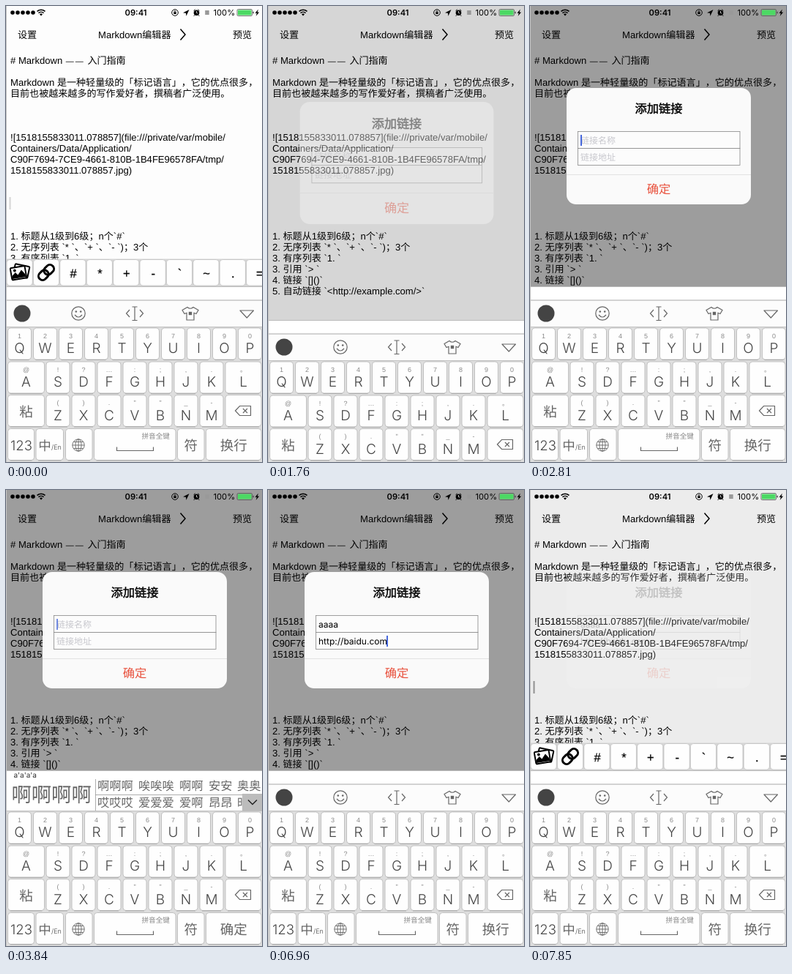
An HTML page that plays this animation: 350x623 px, repeating every 8 s.

```html
<!DOCTYPE html>
<html lang="zh-CN">
<head>
<meta charset="utf-8">
<style>
html, body { margin: 0; width: 100%; height: 100%; overflow: hidden; background: #fff; }
svg { display: block; width: 350px; height: 623px; }
text {
  font-family: "Liberation Sans", "Noto Sans CJK SC", sans-serif;
  white-space: pre; text-spacing-trim: space-all; font-feature-settings: "chws" 0;
  text-rendering: geometricPrecision;
}
.ui { font-family: Inter, "Noto Sans CJK SC", sans-serif; }
.key { font-family: Inter, "Noto Sans CJK SC", sans-serif; font-weight: 300; fill: #444; }
.han { fill: #666; }
.hint { fill: #888; }
.line { fill: none; stroke: #666; stroke-width: 1.2; }
</style>
</head>
<body>
<svg id="stage" viewBox="0 0 350 623" xmlns="http://www.w3.org/2000/svg"></svg>
<script>
const LOOP = 8000, BODY = 13.07;

const text = (x, y, size, str, attrs = '') =>
  `<text x="${x}" y="${y}" font-size="${size}" ${attrs}>${str}</text>`;
const mid = (x, y, size, str, attrs = '') =>
  text(x, y, size, str, 'text-anchor="middle" ' + attrs);
const rect = (x, y, w, h, fill, attrs = '') =>
  `<rect x="${x}" y="${y}" width="${w}" height="${h}" fill="${fill}" ${attrs}/>`;
const path = (d, attrs = 'class="line"') => `<path d="${d}" ${attrs}/>`;
const circle = (x, y, r, attrs) => `<circle cx="${x}" cy="${y}" r="${r}" ${attrs}/>`;
const thin = 'fill="none" stroke="#000" stroke-width="1"';

function statusBar() {
  let s = '';
  for (let i = 0; i < 5; i++) s += circle(9 + i * 7, 9, 2.8, '');
  s += path('M42.5 7.4a8 8 0 0 1 11 0M44.5 9.6a5 5 0 0 1 7 0', 'fill="none" stroke="#000" stroke-width="1.5"');
  s += path('M46 11.2a3 3 0 0 1 4 0l-2 2.2z', '');
  s += mid(177.5, 13, 11.2, '09:41', 'class="ui" font-weight="600"');
  s += circle(231, 9, 4.3, thin) + rect(229.3, 8.3, 3.4, 2.7, '#000') +
    path('M230 8.5v-1a1 1 0 0 1 2 0v1', 'fill="none" stroke="#000" stroke-width=".8"');
  s += path('M250.5 5l-8.5 4.3 4 .4.4 4z', '');
  s += circle(260.5, 9.2, 3.8, '') +
    path('M256.6 6.6l2-1.9M264.4 6.6l-2-1.9M257.8 12.4l-1 1.4M263.2 12.4l1 1.4', thin) +
    path('M260.5 7v2.3l1.6 .8', 'fill="none" stroke="#fff" stroke-width=".8"');
  s += rect(272.2, 6, 5.5, 6, '#999');
  s += text(283.5, 13, 11.2, '100%', 'class="ui"');
  s += rect(316, 4.5, 20.5, 9, 'none', 'rx="1.5" stroke="#555" stroke-width=".8"') +
    rect(317, 5.5, 18.5, 7, '#4cd964') + rect(337.5, 7.5, 1.5, 3, '#555', 'rx=".7"');
  return s + path('M345 4.5l-4.5 5.2h2.4l-1.2 4 4.5-5.3h-2.5z', '');
}

function page() {
  const lines = {
    0: '# Markdown <tspan font-size="11" letter-spacing="2" dx="1">——</tspan> 入门指南',
    2: 'Markdown 是一种轻量级的「标记语言」，它的优点很多，',
    3: '目前也被越来越多的写作爱好者，撰稿者广泛使用。',
    7: '![1518155833011.078857](file:///private/var/mobile/',
    8: 'Containers/Data/Application/',
    9: 'C90F7694-7CE9-4661-810B-1B4FE96578FA/tmp/',
    10: '1518155833011.078857.jpg)',
    16: '1. 标题从1级到6级；n个`#`',
    17: '2. 无序列表 `* `、`+ `、`- `)；3个',
    18: '3. 有序列表 `1. `',
    19: '3. 引用 `&gt; `',
    20: '4. 链接 `[]()`',
    21: '5. 自动链接 `&lt;http://example.com/&gt;`'
  };
  let s = rect(0, 0, 350, 623, '#fdfdfd');
  s += text(16, 44, BODY, '设置') + text(126, 43.5, BODY, 'Markdown编辑器') + text(310, 44, BODY, '预览');
  s += path('M238.5 31.5l6.5 7.5-6.5 7.5', 'fill="none" stroke="#000" stroke-width="1.5"');
  for (const n in lines) s += text(6, 79 + n * 15, BODY, lines[n]);
  return s + rect(4.5, 261, 2, 17, '#999', 'id="pageCaret"');
}

function accessory() {
  const pitch = 36.4;
  let s = rect(0, 345.5, 350, 38, '#d6d6d6');
  for (let i = 0; i < 10; i++)
    s += rect(1 + i * pitch, 346.5, 35.2, 35.5, '#fefefe',
      `rx="4" stroke="#bbb" stroke-width=".7" ${i === 1 ? 'id="linkKey"' : ''}`);
  [...'#*+-`~.='].forEach((c, i) => { s += mid(92 + i * pitch, 370.5, 16.5, c, 'stroke="#000" stroke-width=".25"'); });
  s += '<g fill="#fff" stroke="#000" stroke-width="2">' +
    rect(11, 354, 20, 16, '#fff', 'rx="1.5" transform="rotate(12 21 362)"') +
    rect(7, 356.5, 20, 16.5, '#fff', 'rx="1.5" transform="rotate(-10 17 365)"') + '</g>' +
    path('M9 373l-.6-4 4.4-5 3.5 3.6 4.6-7.2 5.6 6 .6 3.6z', '') + circle(11.8, 361.5, 1.9, '');
  const link = y => rect(49.5, y, 11, 14.5, 'none', 'rx="5.2" stroke="#000" stroke-width="3"');
  return s + `<g transform="rotate(45 55 364)">${link(351.5)}${link(362)}</g>`;
}

function keyboard() {
  const key = (x, y, w, id = '') => rect(x, y, w, 43, '#fefefe', `rx="4" stroke="#b4b4b4" stroke-width=".8" ${id}`) +
    rect(x + 3, y + 43, w - 6, 1, '#aaa');
  const letter = (x, y, w, c, hint) => key(x, y, w) +
    mid(x + w / 2, y + 34, 19, c, 'class="key"') + mid(x + w / 2, y + 13.5, 9, hint, 'class="hint"');
  const wide = (x, y, w, c, id = '') => key(x, y, w, id) + mid(x + w / 2, y + 29.5, 18.5, c, 'class="key han"');
  const slot = i => 2.5 + 35 * i;
  let s = rect(0, 383, 350, 260, '#fff') + rect(0, 401.5, 350, 37, '#fcfcfc') +
    rect(0, 383, 350, .8, '#aaa') + rect(0, 401.5, 350, 1, '#aaa') + rect(0, 438, 350, 210, '#dedede') + rect(0, 438, 350, .8, '#bbb');

  s += circle(22, 420, 11.5, 'fill="#444"');
  s += circle(99, 420, 9.2, 'class="line"') + circle(95.8, 417.5, 1.3, 'fill="#666"') +
    circle(102.2, 417.5, 1.3, 'fill="#666"') + path('M94 422q5 6 10 0');
  s += path('M169 415l-4.5 5 4.5 5M183 415l4.5 5-4.5 5M172.5 411h7M172.5 429.5h7M176 411v18.5');
  s += path('M248 411.5q4 3.5 8 0l7 4-3 5-3-1.2v9.7h-10v-9.7l-3 1.2-3-5z') + rect(249.8, 417.8, 4.4, 4.4, '#666');
  s += path('M320 416h18.5l-9.2 10z', 'class="line" stroke-linejoin="round"');

  [...'QWERTYUIOP'].forEach((c, i) => { s += letter(slot(i), 440, 32, c, (i + 1) % 10); });
  s += letter(2.5, 486, 50, 'A', '@');
  [...'SDFGHJK'].forEach((c, i) => { s += letter(slot(i + 1.5), 486, 32, c, '!?…:;,.'[i]); });
  s += letter(300, 486, 49, 'L', '。');
  s += wide(2.5, 531.5, 50, '粘');
  [...'ZXCVBNM'].forEach((c, i) => { s += letter(slot(i + 1.5), 531.5, 32, c, '().""_-'[i]); });
  s += key(300, 531.5, 49) + path('M313.5 553l6-6.5h15v13h-15zM324 550l6 6m0-6l-6 6');

  s += key(2.5, 577.5, 36) + mid(21, 606.5, 18.5, '123', 'class="key"');
  s += key(41, 577.5, 37.5) + mid(53, 606.5, 17.5, '中', 'class="key han"') + text(62, 606, 9, '/En', 'class="key"');
  s += key(81.5, 577.5, 36.5) + '<g class="line" style="stroke-width:.9">' + circle(99, 600, 8.2, '') +
    '<ellipse cx="99" cy="600" rx="4" ry="8.2"/><path d="M90.8 600h16.4M99 591.8v16.4M92.3 595.5h13.4M92.3 604.5h13.4"/></g>';
  s += key(120.5, 577.5, 111.5) + text(185.5, 590.5, 9.6, '拼音全键', 'class="hint"') + path('M151.5 602.5v5h50v-5');
  s += wide(234.5, 577.5, 36.5, '符') + wide(273.5, 577.5, 75.5, '<tspan id="enterText"></tspan>', 'id="enterKey"');
  return s + `<g id="candidates">${candidates()}</g>`;
}

function candidates() {
  const xs = [125, 181, 237, 277, 316];
  const rows = [['啊啊啊', '唉唉唉', '啊啊', '安安', '奥奥'], ['哎哎哎', '爱爱爱', '爱啊', '昂昂', '时']];
  let s = rect(0, 383, 350, 55, '#fff') + rect(0, 383, 350, .8, '#aaa');
  s += text(10.5, 393, 10, '', 'class="ui" id="pinyin" fill="#333"') + text(7.5, 426, 27.3, '', 'class="key han" id="bigWord"');
  s += rect(122, 395, .8, 43, '#999') + rect(122, 416, 228, .8, '#999');
  rows.forEach((row, r) => row.forEach((w, i) => { s += text(xs[i], 410 + r * 23, 16.3, w, 'class="key han"'); }));
  return s + rect(323, 415, 27, 23.5, '#bcbcbc') + path('M331 423.5l6 6 6-6', 'fill="none" stroke="#222" stroke-width="1.5"');
}

function dialog() {
  const field = 'stroke="#888" stroke-width=".8"';
  return rect(50, 112, 252, 159, '#fafafa', 'rx="13"') +
    mid(176, 146, 16.3, '添加链接', 'stroke="#000" stroke-width=".45"') +
    rect(65.5, 171.5, 221.5, 23, '#fcfcfc', field) + rect(65.5, 194.5, 221.5, 23, '#fcfcfc', field) +
    text(69, 187.5, 12, '', 'class="ui" id="nameText"') + text(69, 211, 12, '', 'class="ui" id="urlText"') +
    rect(69, 176, 2, 15, '#4768dd', 'id="fieldCaret"') +
    rect(50, 230, 252, .8, '#ddd') + mid(176, 256, 16.3, '确定', 'fill="#e8503c" id="okText"');
}

const stage = document.getElementById('stage');
stage.innerHTML =
  '<defs><clipPath id="lens"><circle cx="192" cy="155" r="58"/></clipPath></defs>' + page() +
  rect(1, 0, 349, 623, '#000', 'id="dim"') + statusBar() +
  `<g id="dialog">${dialog()}</g>` +
  `<g id="accessory">${accessory()}</g><g id="keyboard">${keyboard()}</g>` +
  '<g id="loupe"><g clip-path="url(#lens)"><g transform="translate(192 155) scale(1.25) translate(-192 -206)"><use href="#dialog"/></g></g>' +
  circle(192, 155, 58, 'fill="none" stroke="#aaa" stroke-width="2"') + '</g>' +
  `<g id="menu">${rect(40, 148, 60, 36, '#222', 'rx="7" id="menuBox"')}${path('M62 183h16l-8 9z', 'fill="#222"')}${mid(70, 171, 13, '粘贴', 'fill="#fff"')}</g>` +
  rect(0, 0, 1, 623, '#c4c4c4');

const el = {};
stage.querySelectorAll('[id]').forEach(n => { el[n.id] = n; });

// Value of the last [time, value] pair that has begun.
const at = (t, steps) => steps.reduce((v, [from, next]) => t >= from ? next : v, 0);
const set = (id, attrs) => { for (const k in attrs) el[id].setAttribute(k, attrs[k]); };
const show = (id, on) => set(id, { display: on ? 'inline' : 'none' });
const within = (t, a, b) => t >= a && t < b;
const write = (id, str, placeholder) => {
  if (el[id].textContent !== (str || placeholder)) el[id].textContent = str || placeholder;
  if (placeholder) set(id, { fill: str ? '#000' : '#c7c7cd' });
};

function draw(t) {
  set('pageCaret', { opacity: at(t, [[0, .4], [150, 0], [590, .5], [740, 1], [1030, 0], [1480, .5], [1620, 0], [7850, 1]]) });
  set('linkKey', { fill: within(t, 1330, 1620) ? '#d8d8d8' : '#fefefe' });

  const alpha = at(t, [[1760, .4], [1910, .94], [2060, .99], [2210, 1], [7560, .85], [7700, .55], [7850, .18]]);
  const drop = at(t, [[1760, 46], [1910, 12], [2060, 3], [2210, 0]]);
  const scale = 1 + drop * .0011;
  set('dim', { opacity: .38 * alpha });
  set('dialog', {
    opacity: alpha,
    transform: `translate(176 ${191.5 + drop / 2}) scale(${scale}) translate(-176 -191.5)`
  });
  set('keyboard', { transform: `translate(0 ${drop})` });
  show('accessory', !within(t, 1760, 7700));

  const typed = within(t, 2960, 4290) ? at(t, [[2960, 1], [3110, 2], [3250, 3], [3400, 4]]) : 0;
  show('candidates', typed);
  write('pinyin', Array(typed).fill('a').join("'"));
  write('bigWord', '啊'.repeat(typed));
  write('enterText', typed ? '确定' : '换行');
  set('enterKey', { fill: within(t, 4140, 4290) ? '#d0d0d0' : '#fefefe' });

  write('nameText', t >= 4290 ? 'aaaa' : '', '链接名称');
  write('urlText', t >= 6810 ? 'http://baidu.com' : '', '链接地址');
  set('fieldCaret', {
    x: t >= 6810 ? 162 : within(t, 4290, 4880) ? 95.5 : 69,
    y: t >= 4880 ? 199 : 176,
    opacity: at(t, [[1910, 1], [2510, 0], [2810, 1], [3540, .3], [3840, .75], [4290, 1], [4880, .5],
      [5030, 1], [5470, .55], [5620, 0], [5920, 1], [7410, 0]])
  });
  set('okText', { opacity: within(t, 7410, 7560) ? .4 : 1 });

  show('loupe', within(t, 5920, 6370));
  set('loupe', { opacity: t < 6070 ? .6 : 1 });
  show('menu', within(t, 6370, 6960));
  set('menu', { opacity: t >= 6810 ? .4 : 1 });
  set('menuBox', { fill: within(t, 6670, 6810) ? '#555' : '#222' });
}

function frame() {
  draw(performance.now() % LOOP);
  requestAnimationFrame(frame);
}
frame();
</script>
</body>
</html>
```
